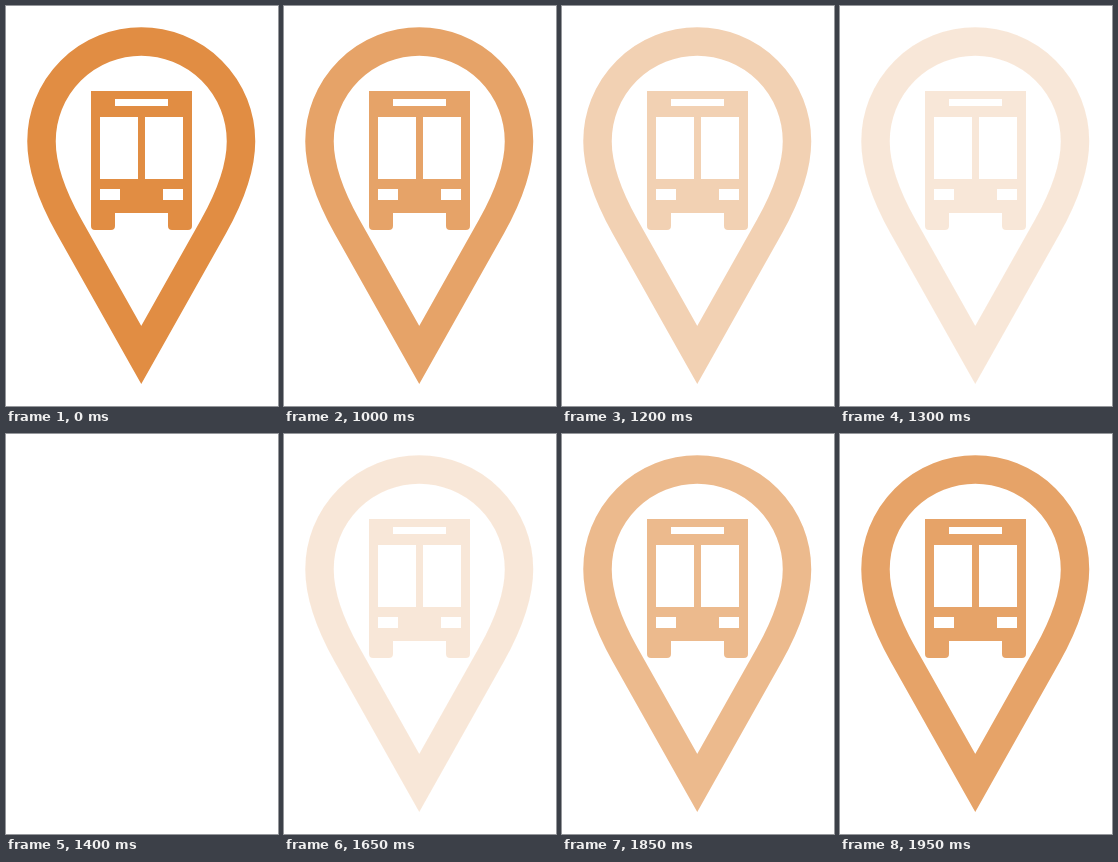
An HTML page that plays this animation: 272x400 px, repeating every 2.05 s.

```html
<!DOCTYPE html>
<html lang="en">
<head>
<meta charset="utf-8">
<title>Bus stop pin</title>
<style>
  html, body { margin: 0; width: 100%; height: 100%; overflow: hidden; background: #fff; }
  svg { display: block; }
</style>
</head>
<body>
<svg id="pin" width="272" height="400" viewBox="0 0 272 400" fill="#e18d43">
  <path fill="none" stroke="#e18d43" stroke-width="28.5" stroke-miterlimit="4"
    d="M135.25 349L63 220.5C48 193.8 35.5 165 35.5 135.25a99.75 99.75 0 0 1 199.5 0C235 165 222.5 193.8 207.5 220.5Z"/>
  <!-- bus body with wheels, then sign, windows and lights as holes -->
  <path fill-rule="evenodd"
    d="M85 85H186V220q0 4-4 4H166q-4 0-4-4V207H109V220q0 4-4 4H89q-4 0-4-4Z
       M109 93V100H162V93Z
       M94 111V173H132V111Z M139 111V173H177V111Z
       M94 183V194H114V183Z M157 183V194H177V183Z"/>
</svg>
<script>
  const LOOP = 2050, STEP = 100, FADE_OUT = 1000, FADE_IN = 1650;
  const pin = document.getElementById("pin");

  // Opacity moves in fifths: down to nothing, a pause, then up again.
  function opacityAt(t) {
    if (t < FADE_OUT) return 1;
    const level = t < FADE_IN
      ? 4 - Math.floor((t - FADE_OUT) / STEP)
      : 1 + Math.floor((t - FADE_IN) / STEP);
    return Math.max(0, level) / 5;
  }

  const start = performance.now();
  function draw() {
    pin.style.opacity = opacityAt((performance.now() - start) % LOOP);
    requestAnimationFrame(draw);
  }
  draw();
</script>
</body>
</html>
```
